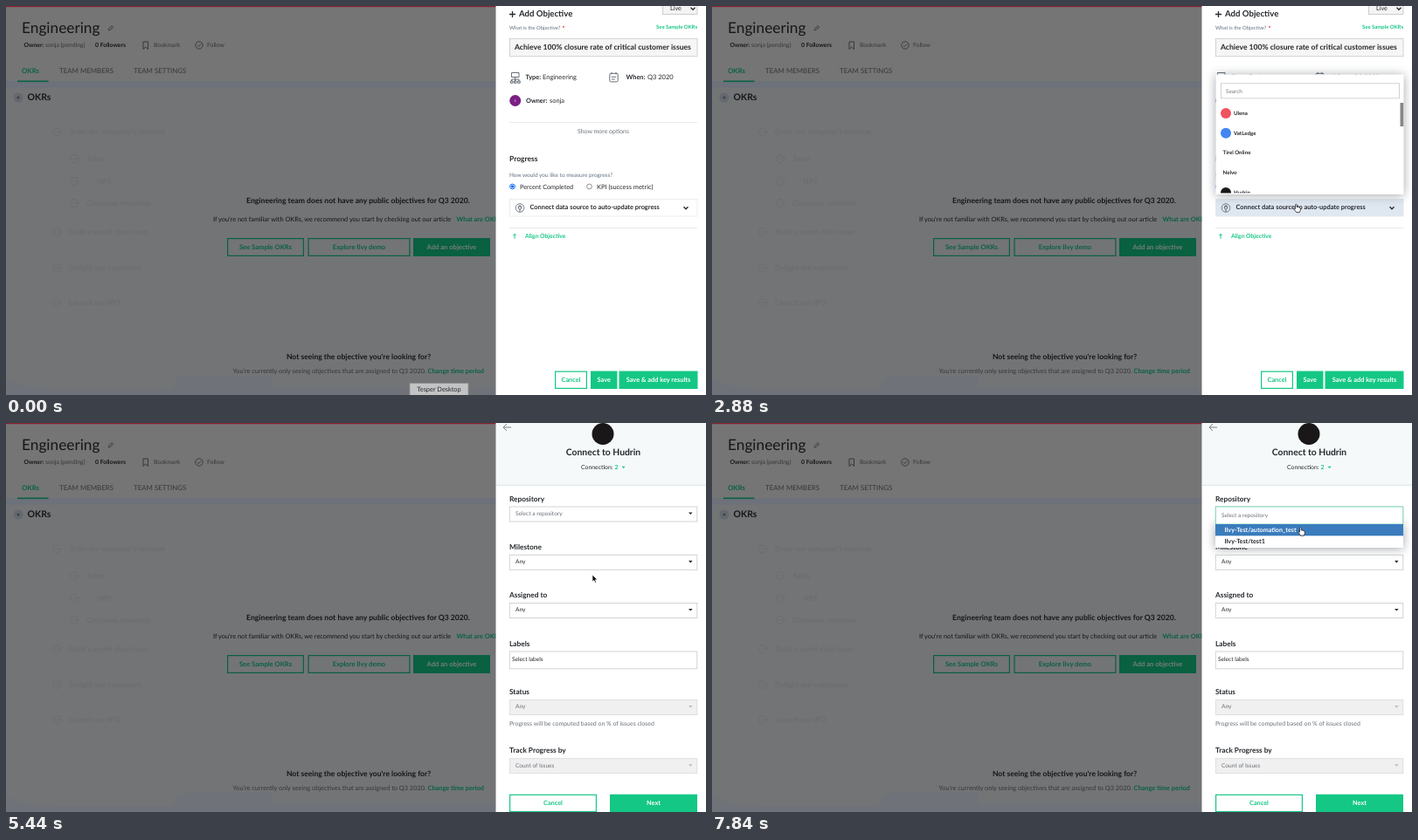
Write an HTML page that moves like this. It is 801 px wide and 446 px high and loops after 8000 ms.

```html
<!DOCTYPE html>
<html lang="en">
<head>
<meta charset="utf-8">
<title>Add objective</title>
<style>
html, body { margin: 0; width: 100%; height: 100%; overflow: hidden; background: #fff; }
#stage { display: block; width: 801px; height: 446px; font-family: Lato, "Open Sans", sans-serif; text-rendering: geometricPrecision; }
.pop { filter: drop-shadow(0 1px 6px rgba(30, 40, 50, .42)); }
</style>
</head>
<body>
<svg id="stage" viewBox="0 0 801 446"><g id="page"></g><g id="panel"></g><g id="pointer"></g></svg>
<script>
const LOOP = 8000, STEP = 160;
const GREEN = '#14c784', INK = '#25282c', GREY = '#6b7178', LINE = '#cbced0', DIM_GREEN = '#096141';
const $ = id => document.getElementById(id);

// Text is placed by its vertical centre.
const text = (x, y, size, str, fill = INK, bold = false, anchor = 'start') =>
  `<text x="${x}" y="${y + size * .32}" font-size="${size}" fill="${fill}" font-weight="${bold ? 700 : 400}" text-anchor="${anchor}">${str}</text>`;
const bold = (x, y, size, str, fill, anchor) => text(x, y, size, str, fill, true, anchor);
const rect = (x, y, w, h, fill, stroke = 'none', sw = 1) =>
  `<rect x="${x}" y="${y}" width="${w}" height="${h}" fill="${fill}" stroke="${stroke}" stroke-width="${sw}"/>`;
const circle = (x, y, r, fill, stroke = 'none', sw = 1) =>
  `<circle cx="${x}" cy="${y}" r="${r}" fill="${fill}" stroke="${stroke}" stroke-width="${sw}"/>`;
const path = (d, stroke, sw = 1, fill = 'none') =>
  `<path d="${d}" stroke="${stroke}" stroke-width="${sw}" fill="${fill}"/>`;
const button = (x, y, w, h, label, size, color, solid, ink = '#fff') =>
  rect(x + .6, y + .6, w - 1.2, h - 1.2, solid ? color : 'none', color, 1.2) +
  bold(x + w / 2, y + h / 2, size, label, solid ? ink : color, 'middle');

function dimmedPage() {
  const dark = '#151618', mid = '#34373b', faint = '#6c6d6f';
  const ghosts = [[58, 144.5, 72, "Grow our company's revenue"], [78, 175, 93, 'Sales'], [78, 201, 104, 'NPS'],
    [78, 226, 92, 'Customer retention'], [58, 259, 72, 'Build a world class team'],
    [58, 300, 72, 'Delight our customers'], [58, 340, 72, 'Launch our IPO']];
  return rect(0, 0, 561, 446, '#737476') + rect(0, 0, 561, 86, '#757575') + rect(0, 0, 561, 1.2, '#87212f') +
    rect(0, 86, 561, 7.5, '#6d717a') +
    path('M0 427Q20 439 60 439H190Q194 424 205 424H305V437H561V446H0z', 'none', 0, '#6f7279') +
    text(18, 25, 17.3, 'Engineering', dark) +
    path('M117 28l1-2.5 3-3 1.7 1.7-3 3zM119.5 24l1.7 1.7', mid, .8) +
    bold(20.5, 45, 6.8, 'Owner:', dark) + text(45, 45, 6.9, 'sonja (pending)', mid) +
    bold(102, 45, 6.85, '0 Followers', dark) +
    path('M157 41h5.5v8.5l-2.75-2.5-2.75 2.5z', mid) + text(169, 45, 6.8, 'Bookmark', mid) +
    circle(221, 45, 4.2, 'none', mid, .9) + path('M219 45l1.5 1.5 2.7-3', mid, .9) + text(230, 45, 6.85, 'Follow', mid) +
    bold(18, 74.5, 7.8, 'OKRs', DIM_GREEN) + text(61, 74.5, 7.9, 'TEAM MEMBERS', mid) + text(146, 74.5, 7.9, 'TEAM SETTINGS', mid) +
    rect(13, 85.5, 35.5, 1.6, DIM_GREEN) +
    circle(14, 105, 5.5, '#64686f') + path('M12.3 105h3.4M14 103.3v3.4', '#2c2f33', .8) +
    bold(24.5, 104.5, 10.5, 'OKRs', dark) +
    ghosts.map(([ix, y, x, s]) => circle(ix, y, 4.5, 'none', faint, .9) + path(`M${ix - 2} ${y}h8`, faint, .8) + bold(x, y, 8.5, s, faint)).join('') +
    bold(403, 223, 8.63, 'Engineering team does not have any public objectives for Q3 2020.', dark, 'middle') +
    text(237, 244.5, 7.38, "If you're not familiar with OKRs, we recommend you start by checking out our article", dark) +
    bold(515.5, 244.5, 7.4, 'What are OKRs?', DIM_GREEN) +
    button(253, 266, 88, 21, 'See Sample OKRs', 7.6, DIM_GREEN) +
    button(345.5, 266, 117, 21, 'Explore Ilvy demo', 7.6, DIM_GREEN) +
    button(466, 266, 88, 21, 'Add an objective', 7.6, DIM_GREEN, true, '#7a7d7c') +
    bold(403.5, 402.5, 8.55, "Not seeing the objective you're looking for?", dark, 'middle') +
    text(259.5, 418.5, 7.37, "You're currently only seeing objectives that are assigned to Q3 2020.", mid) +
    bold(482.5, 418.5, 7.4, 'Change time period', DIM_GREEN);
}

const sheet = rect(560.5, 0, 240.5, 446, '#fff');
const chevron = (x, y, color = INK) => path(`M${x - 2.5} ${y - 1.2}l2.5 2.5 2.5-2.5`, color, 1.3);

const objectiveForm = open => sheet +
  path('M576 9.5h7M579.5 6v7', INK, 1.3) + bold(587, 9, 9.6, 'Add Objective') +
  rect(751.5, -6, 39.5, 15.5, '#f4f4f4', '#c4c4c4', .8) + text(760, 3, 7.2, 'Live') + chevron(786, 3) +
  text(576, 25, 5.85, 'What is the Objective?', '#5f6f80') + bold(636.5, 25.5, 7, '*', '#e02020') +
  bold(791, 24, 5.95, 'See Sample OKRs', GREEN, 'end') +
  rect(576.5, 37.3, 214.5, 20.5, '#f6f6f6', LINE, .9) +
  bold(582, 47.5, 8.6, 'Achieve 100% closure rate of critical customer issues') +
  path('M578.5 76.5h8.5v5h-8.5zM582.7 81.5v5M578.7 86v-2h8.2v2M577.3 86h2.6v2.3h-2.6zM581.4 86h2.6v2.3h-2.6zM585.6 86h2.6v2.3h-2.6z', '#444d57', .8) +
  bold(594.5, 82, 7.3, 'Type:') + text(614, 82, 7.5, 'Engineering') +
  `<rect x="690.8" y="77.3" width="9.4" height="9.6" rx="1.5" fill="none" stroke="#444d57" stroke-width=".8"/>` +
  path('M693 76v2.3M698 76v2.3M692.8 81.3h5.4M692.8 84h4', '#444d57', .8) +
  bold(709.5, 82, 7.4, 'When:') + text(734, 82, 7.5, 'Q3 2020') +
  circle(582.7, 108.5, 6.5, '#7b1f83') + text(582.7, 108, 5, 's', '#e6cfe8', false, 'middle') +
  bold(595, 108.5, 7.3, 'Owner:') + text(622, 108.5, 7.4, 'sonja') +
  path('M576 133.5h215M576 254.5h215', '#e3e5e7', .8) +
  text(683.5, 143.5, 6.96, 'Show more options', GREY, false, 'middle') +
  bold(576, 175.5, 8.45, 'Progress') +
  text(576, 194, 6.5, 'How would you like to measure progress?', '#5f6f80') +
  circle(579.5, 207, 2.9, '#fff', '#1a73e8', 1) + circle(579.5, 207, 1.8, '#1a73e8') + text(588, 207.5, 7.28, 'Percent Completed') +
  circle(667.5, 207, 2.9, '#fff', '#777', .8) + text(676, 207.5, 7.45, 'KPI (success metric)') +
  rect(576.5, 221.5, 214.5, 19.5, open ? '#dfe7f1' : '#fff', open ? '#dfe7f1' : '#e6e8ea', .8) +
  circle(588, 231.5, 4.8, 'none', '#68717b', .9) + path('M586.3 230v2.2q1.7 2 3.4 0v-2.2zM587.2 230v-1.6M588.8 230v-1.6M588 233v3', '#444d57', .8) +
  bold(599.5, 231, 7.4, 'Connect data source to auto-update progress') + chevron(778, 231.5) +
  path('M582 266.8v-5.4M580.2 263.2l1.8-1.8 1.8 1.8', GREEN, 1) + bold(594, 263.5, 6.75, 'Align Objective', GREEN) +
  button(628, 418.5, 37, 20.5, 'Cancel', 7.3, GREEN) +
  button(669, 418.5, 30.5, 20.5, 'Save', 7.4, GREEN, true) +
  button(701.5, 418.5, 90, 20.5, 'Save &amp; add key results', 7.45, GREEN, true);

// Name, icon colour, square icon, slow to load
const SOURCES = [['Ulena', '#f0525f'], ['VatLedge', '#4285f4'], ['Tirel Online', '#1f7244', 1, 1],
  ['Nelvo', '#4527a0', 1, 1], ['Hudrin', '#191717'], ['Polnek', '#f4652b']];

function sourceList(t, mouse) {
  const scroll = 35 * ease((t - 4160) / 480), loaded = t >= 3040, pitch = 22.75;
  const rows = SOURCES.map(([name, color, square, slow], i) => {
    const y = 123 + i * pitch - scroll, ready = loaded || !slow;
    const hover = mouse.y < 214 && Math.abs(mouse.y - y) < pitch / 2;
    return (hover ? rect(576, y - 11, 216, 22, '#f1f1f1') : '') +
      (!ready ? '' : square ? rect(582, y - 6, 12, 12, color) : circle(588, y, 6, color)) +
      bold(ready ? 597 : 584.5, y, 6.15, name);
  }).join('');
  return `<g class="pop">${rect(576.5, 78.5, 215, 137.5, '#fff')}</g>` +
    rect(582.5, 88.8, 204, 17, '#fff', LINE, .9) + text(588, 97.5, 6.4, 'Search', '#74797e') +
    `<svg x="576.5" y="110" width="215" height="104.5" viewBox="576.5 110 215 104.5">${rows}</svg>` +
    rect(787.5, 111 + scroll * 9 / 35, 3.7, 27, '#868686');
}

function field(label, y, h, value, color = INK, off = false, x = 583, arrow = true) {
  return bold(576, y - 9, 8.3, label) + rect(576.3, y, 214.5, h, off ? '#f0f0f0' : '#fff', off ? '#dcdcdc' : LINE, .9) +
    text(x, y + h / 2 - .8, 6.6, value, color) +
    (arrow ? path(`M781 ${y + 6.5}h4.6l-2.3 2.6z`, 'none', 0, off ? '#bbb' : INK) : '');
}

function connectForm(t) {
  const open = t >= 6560;
  let out = sheet + rect(561, 0, 240, 71, '#f5f9fa') + rect(561, 70.8, 240, .9, '#d8dee1') +
    path('M578 5h-9M573 1l-4 4 4 4', '#7a8085', 1) + circle(683, 12.5, 12.5, '#191717') +
    bold(683.5, 34, 10.35, 'Connect to Hudrin', INK, 'middle') +
    text(658, 50.5, 6.85, 'Connection:') + bold(696.5, 50.5, 6.9, '2', GREEN) + path('M704.6 49.8h4l-2 2.2z', 'none', 0, GREEN) +
    field('Repository', 96, 17, 'Select a repository', GREY, false, 583, !open) +
    field('Milestone', 151.3, 17, 'Any') + field('Assigned to', 206.5, 17, 'Any') +
    field('Labels', 262, 19.8, 'Select labels', INK, false, 579, false) +
    field('Status', 317.5, 17, 'Any', GREY, true) +
    text(576, 345, 6.96, 'Progress will be computed based on % of issues closed', GREY) +
    field('Track Progress by', 384.7, 17, 'Count of Issues', GREY, true) +
    button(576, 425.7, 100, 20.5, 'Cancel', 7.3, GREEN) + button(691, 425.7, 100, 20.5, 'Next', 7.3, GREEN, true);
  if (open) out += `<g class="pop">${rect(576, 115, 215, 28, '#fff')}</g>` +
    rect(576.3, 96, 214.5, 20, '#fff', '#6fd6ae', .9) + text(583, 105.8, 6.5, 'Select a repository', GREY) +
    (t < 7100 ? rect(582.6, 101.5, .8, 9, INK) : '') +
    rect(576, 116, 215, 13.3, '#3a7cbd') + bold(586.5, 122.5, 7.17, 'Ilvy-Test/automation_test', '#fff') +
    bold(586.5, 135.5, 7.17, 'Ilvy-Test/test1');
  return out;
}

// Time, x, y of the hot spot, shape from then on
const TRACK = [[160, 600, 390, 'arrow'], [320, 690, 228, 'arrow'], [800, 690, 228, 'arrow'], [1280, 667, 204, 'arrow'],
  [1600, 664.5, 201, 'arrow'], [2400, 667.5, 227, 'hand'], [2880, 667.5, 227, 'hand'], [3680, 690, 186, 'hand'],
  [4000, 693.5, 176, 'hand'], [4960, 693.5, 176, 'hand'], [5440, 671, 174, 'arrow'], [5600, 671, 174, 'arrow'],
  [6240, 655, 101, 'beam'], [7040, 655, 101, 'beam'], [7520, 672.5, 119.5, 'hand'], [LOOP, 672.5, 119.5, 'hand']];
const SHAPES = {
  arrow: path('M0 0v8l1.8-1.7 1.3 2.8 1.4-.6-1.3-2.7h2.5z', '#fff', .7, '#000'),
  hand: path('M0 .8q.9-1.2 1.7 0v2.7q1-.5 1.5.3 1-.4 1.4.4 1.2-.2 1.2 1v2l-1 2.4h-3.6l-2.9-3.7q0-1.2 1.7-.2z', '#222', .8, '#fff'),
  beam: path('M-1.6-4q1.6 0 1.6 1v6q0 1-1.6 1M1.6-4q-1.6 0-1.6 1v6q0 1 1.6 1', '#222', .8)
};

function ease(p) {
  p = Math.min(1, Math.max(0, p));
  return p * p * (3 - 2 * p);
}

function mouseAt(t) {
  const i = TRACK.findIndex(k => k[0] > t) - 1;
  if (i < 0) return { x: 0, y: -99, shape: 'arrow' };
  const [t0, x0, y0, shape] = TRACK[i], [t1, x1, y1] = TRACK[i + 1], p = ease((t - t0) / (t1 - t0));
  return { x: x0 + (x1 - x0) * p, y: y0 + (y1 - y0) * p, shape };
}

function draw(t) {
  const mouse = mouseAt(t), open = t >= 2720;
  const tip = t < STEP ? rect(462, 432.5, 67, 16, '#c2c3c4', '#8f9092', .8) + text(495.5, 439.5, 7.4, 'Tesper Desktop', INK, false, 'middle') : '';
  $('panel').innerHTML = tip + (t >= 5440 ? connectForm(t) : objectiveForm(open) + (open ? sourceList(t, mouse) : ''));
  $('pointer').innerHTML = `<g transform="translate(${mouse.x} ${mouse.y})">${SHAPES[mouse.shape]}</g>`;
}

$('page').innerHTML = dimmedPage();
const start = performance.now();
let last = -1;
function tick() {
  const t = Math.floor((performance.now() - start) % LOOP / STEP) * STEP;
  if (t !== last) draw(last = t);
  requestAnimationFrame(tick);
}
tick();
</script>
</body>
</html>
```
